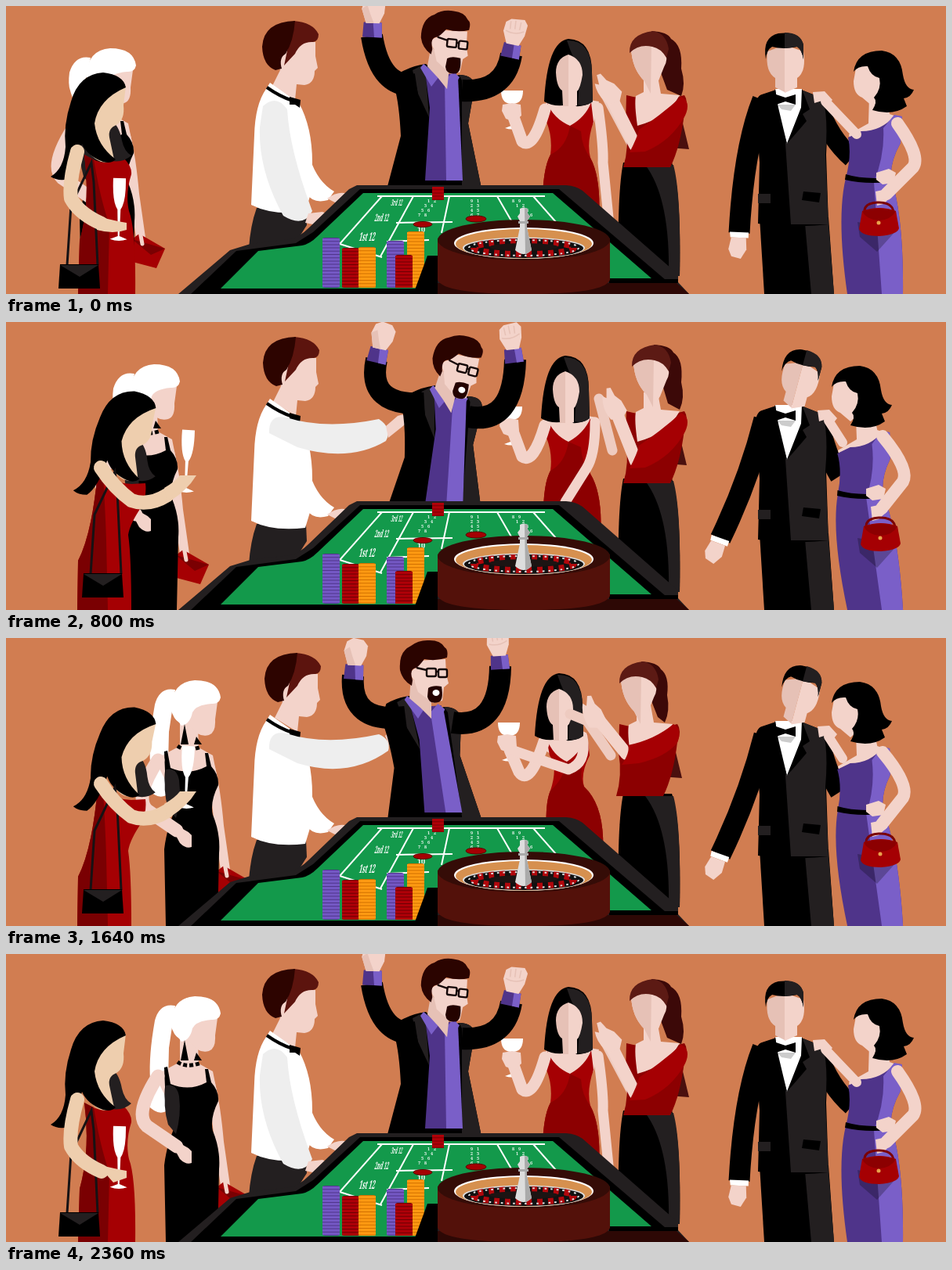
Recreate the animation shown at these times as an HTML page. Size 1200 px wide and 368 px high, loop 2.4 s.

```html
<!DOCTYPE html>
<html lang="en">
<head>
<meta charset="utf-8">
<title>Casino night</title>
<style>
html, body { margin: 0; width: 100%; height: 100%; overflow: hidden; background: #d17d51; }
svg { display: block; width: 100%; height: 100%; }
.skin { fill: #f3d3ca; }
.shade { fill: #e6c1b6; }
.tan { fill: #eeceae; }
.red { fill: #a50003; }
.crimson { fill: #8c0001; }
.wine { fill: #7a0002; }
.gray { fill: #231f20; }
.violet { fill: #7a5fc8; }
.plum { fill: #4f348a; }
.white { fill: #fff; }
.limb { fill: none; stroke: #f3d3ca; stroke-linecap: round; stroke-linejoin: round; }
.sleeve { fill: none; stroke: #000; }
.line { fill: none; stroke: #fff; stroke-width: 2; }
.chips { fill: none; stroke-width: 22; stroke-dasharray: 3.2 1; }
text { fill: #fff; font-family: "Noto Serif", serif; font-weight: 700; }
</style>
</head>
<body>
<svg viewBox="0 0 1200 368" preserveAspectRatio="none">
<rect width="1200" height="368" fill="#d17d51"/>

<!-- Blonde woman walking in -->
<g data-seq="0123444" data-m="translate(-108 0)|translate(-87 -2)|translate(-52 0)|translate(-17 1)|translate(0 0)">
  <path class="white" data-d="M216 66Q196 62 189 85Q187 100 190 108Q192 116 194 118Q200 120 206 118L208 100Z|M216 66Q196 62 189 85Q187 100 190 108Q192 116 194 118Q200 120 206 118L208 100Z|M216 66Q196 62 189 85Q187 100 190 108Q192 116 194 118Q200 120 206 118L208 100Z|M216 66Q196 62 189 85Q187 100 190 108Q192 116 194 118Q200 120 206 118L208 100Z|M216 66Q196 62 190 85Q182 130 184 160Q177 180 180 192Q194 208 206 200L208 120Z"/>
  <path class="limb" stroke-width="12" d="M261 166Q268 195 272 240L280 296"/>
  <path class="red" d="M269 298L278 291L311 310L300 335L266 326Z"/>
  <path class="wine" d="M269 298L311 310L293 318Z"/>
  <path class="limb" stroke-width="5" d="M279 288L282 304"/>
  <path class="skin" d="M222 105L245 115L246 140L264 150L270 180L205 185L190 155L222 138Z"/>
  <path d="M202 145L206 144L210 166Q234 176 256 164L254 147L258 147L262 164Q272 175 271 188Q260 210 264 226Q274 250 272 275L270 368H204L202 270Q205 245 214 224Q200 195 203 170Z"/>
  <path class="gray" d="M204 168Q218 165 221 182Q224 205 217 230L207 218Q200 195 204 168Z"/>
  <path class="limb" stroke-width="17" d="M194 156Q163 204 180 220L218 246"/>
  <path class="skin" d="M210 240Q228 242 237 252L237 267Q230 270 222 262Z"/>
  <path class="skin" d="M230 84L270 82L267 104Q268 121 259 124Q246 128 234 112L222 108Z"/>
  <path class="white" d="M210 90Q212 56 241 54Q271 54 274 76Q272 85 262 84Q242 86 238 95Q235 110 224 112L221 108Q214 104 210 90Z"/>
  <path d="M228 110L223 136H233ZM243 126L240 136H250Z"/>
  <path fill="none" stroke="#000" stroke-width="5" stroke-dasharray="5 3" d="M219 138Q230 146 249 139"/>
</g>

<!-- Dark haired woman with flute -->
<g data-seq="0122220">
  <path class="red" data-d="M100 190Q122 204 135 198L150 194Q161 205 160 215Q152 240 157 262Q166 285 165 368H92L94 300Q108 250 100 190Z|M108 192Q126 205 145 198L160 198Q167 208 165 220Q158 240 158 262Q164 285 163 368H91L96 300Q110 250 108 192Z|M117 192Q138 206 160 207L178 206Q180 222 173 236Q158 258 156 272Q160 300 160 368H91L92 305Q110 270 117 192Z"/>
  <path class="wine" data-d="M100 190L112 196Q120 245 132 280L130 368H92L94 300Q108 250 100 190Z|M108 192L118 196Q120 245 128 280L128 368H91L96 300Q110 250 108 192Z|M117 192L124 197Q127 245 128 280L130 368H91L92 305Q110 270 117 192Z"/>
  <g data-m="translate(0 0) rotate(0)|translate(1 6) rotate(-3)|translate(48 -7) rotate(5)">
    <path class="gray" d="M132 146Q144 150 148 172Q151 186 160 191Q148 202 130 197L112 172Z"/>
    <path class="tan" d="M153 102L150 127Q152 145 141 152Q130 156 132 168L138 196Q120 207 104 185L106 125Z"/>
    <path d="M153 104Q150 88 124 85Q93 87 83 122Q73 152 76 180Q74 208 57 218Q64 223 75 222Q88 212 97 176Q104 192 124 199Q134 202 140 196Q116 178 113 150Q118 119 153 104Z"/>
  </g>
  <g data-m="translate(0 0)|translate(15 -14)|translate(30 -9)">
    <path fill="none" stroke="#161214" stroke-width="3" d="M78 331L83 255L109 200L112 225L117 331"/>
    <path d="M69 330H118L120 361H67Z"/><path class="gray" d="M69 331H118L94 346Z"/>
  </g>
  <g data-m="translate(145 220) rotate(1)|translate(197 180) rotate(1)|translate(233 138) rotate(3)">
    <path class="white" d="M-8 0H8Q9 30 2 40L1 74L11 78Q0 82-11 78L-1 74L-2 40Q-9 30-8 0Z"/>
  </g>
  <path class="limb" style="stroke:#eeceae" stroke-width="18" data-d="M91 186Q80 225 83 246Q94 266 122 278|M104 188Q112 220 118 236Q138 253 166 253|M121 186Q138 212 160 228Q182 236 206 221"/>
  <path class="tan" data-d="M117 269Q137 274 154 277L154 286Q137 292 116 286Z|M162 245Q182 245 193 238L211 240L206 250Q184 261 162 261Z|M202 212Q216 204 222 196L243 196L236 206Q220 224 206 230Z"/>
</g>

<!-- Dealer -->
<path class="gray" d="M320 258H383L384 280L365 310H310Q312 280 320 258Z"/>
<g data-seq="0123450" data-m="translate(0 0)|translate(3 0)|translate(1 0)|translate(6 1)|translate(3 0)|translate(5 1)">
  <path class="skin" d="M360 46L395 46L395 64L398 79L394 83Q394 99 381 101L371 100L369 120L340 102L350 82Q342 66 354 62Z"/>
  <path fill="#5c140e" d="M367 19Q392 21 399 36Q399 45 392 46Q376 45 369 61L355 76Z"/>
  <path fill="#2d0400" d="M369 19Q329 20 327 52Q328 76 344 82L352 80Q348 66 357 61Q367 45 369 19Z"/>
</g>
<path class="white" d="M388 195Q398 225 419 237L411 248Q392 253 384 240Z"/>
<path class="skin" d="M410 246Q424 236 436 240L444 248L440 254L422 252Z"/>
<path class="white" d="M337 98L374 124Q391 155 391 200L389 240L382 263Q340 268 313 254L317 165Q318 126 332 106Z"/>
<path fill="none" stroke="#000" stroke-width="4" d="M333 104Q350 116 366 121"/>
<path d="M362 116L376 120L375 130L369 126L362 126Z"/>
<g data-seq="0012340">
  <path fill="#eee" data-d="M328 128Q345 112 359 132Q362 185 391 262Q380 284 354 268Q322 210 324 155Z|M336 142Q335 117 358 122Q408 138 476 124Q494 136 485 152Q438 180 372 160Z|M336 142Q335 117 358 122Q408 138 468 121Q486 130 481 142Q428 182 372 164Z|M336 142Q335 117 358 122Q408 138 476 123Q492 130 488 144Q438 180 372 160Z|M336 142Q335 117 358 122Q408 138 466 123Q482 132 476 148Q428 184 372 168Z"/>
  <path class="skin" data-d="M386 265L404 263Q414 266 420 276L406 282L382 277Z|M485 133L500 120Q510 116 518 121L508 132L488 148Z|M474 126L490 110Q498 106 506 110L504 122L484 138Z|M484 125L502 110Q508 106 518 110L512 124L490 138Z|M470 127L486 111Q490 106 498 111L496 129L476 146Z"/>
</g>

<!-- Woman in red with coupe glass -->
<g data-seq="0012220">
  <path class="skin" data-d="M708 100H731L732 118L757 122L750 150L720 160L683 138L690 123L708 119Z|M708 100H730L731 118L754 122L750 150L720 160L683 138L690 123L708 119Z|M699 100H723L724 120L741 121L744 150L716 162L680 138L686 124L699 120Z"/>
  <path class="red" data-d="M691 124Q699 144 720 153Q740 142 747 123L750 148Q741 174 746 194Q760 220 757 275H685Q683 212 695 190Q698 168 690 148Z|M691 124Q699 144 718 153Q738 142 746 123L748 148Q739 174 746 194Q762 220 759 275H687Q683 212 695 190Q698 168 690 148Z|M690 128Q698 150 716 158Q735 146 742 122L745 150Q733 174 738 190Q765 215 762 275H692Q686 215 695 195Q705 165 694 150Z"/>
  <path class="crimson" data-d="M720 153L734 160Q735 180 746 194Q760 220 757 275H685Q683 212 695 190Q716 180 720 153Z|M718 153L734 160Q735 180 746 194Q762 220 759 275H687Q683 212 695 190Q714 180 718 153Z|M716 158L736 160Q732 178 738 190Q765 215 762 275H692Q686 215 695 195Q712 180 716 158Z"/>
  <path class="white" data-m="translate(646 107)|translate(645 107)|translate(642 107)" d="M-14 1H14Q14 17 2 18L1 46L9 49Q0 52-9 49L-1 46L-2 18Q-14 17-14 1Z"/>
  <path class="limb" stroke-width="15" data-d="M688 132Q673 184 659 173L648 142|M688 132Q673 182 659 172L648 142|M687 132Q668 190 655 171L643 143"/>
  <path class="skin" data-m="translate(646 134)|translate(643 133)|translate(640 133)" d="M-12-8L0-10L11-8L12 6L3 14L-8 10L-13 0Z"/>
  <path class="limb" stroke-width="13" data-d="M756 130Q763 180 762 200L769 270|M752 128Q752 170 741 187L714 230|M736 126Q742 160 718 168L648 144"/>
  <g data-m="translate(0 0)|translate(-4 1)|translate(-12 3)">
    <path d="M687 122Q691 45 718 42Q748 43 748 85L749 122Q733 132 719 126Q700 130 687 122Z"/>
    <path class="gray" d="M716 44Q747 43 748 85L749 122Q741 129 730 126L733 80Q724 69 716 44Z"/>
    <path class="shade" d="M718 62Q702 67 702 85Q703 104 710 108L711 128H720Z"/>
    <path class="skin" d="M718 62Q736 68 736 88Q733 106 729 109V127L718 132Z"/>
  </g>
</g>

<!-- Clapping woman -->
<g data-seq="0123440">
  <path fill="#4a100e" data-m="translate(0 0)|translate(3 0)|translate(-3 0)|translate(-19 -4)|translate(-9 -4)" d="M850 150L864 150L872 183L846 181Z"/>
  <path class="limb" style="stroke:#eecbc0" stroke-width="13" data-d="M800 178L766 114|M800 180L769 114|M774 164L757 98|M776 150L742 98|M772 150L742 106L720 97"/>
  <g data-m="translate(0 0)|translate(2 0)|translate(0 0)|translate(-5 -1)|translate(0 -1)">
    <path d="M788 200H850Q862 235 860 345H782Q780 240 788 200Z"/>
    <path class="gray" d="M816 203H852Q862 240 860 345H846Q848 245 816 203Z"/>
  </g>
  <g data-m="translate(0 0)|translate(2 0)|translate(0 0)|translate(-14 -4)|translate(-9 -4)">
    <path class="crimson" d="M792 114Q830 124 866 114Q872 122 866 137Q861 180 848 206H788Q796 180 791 150Z"/>
    <path class="skin" d="M814 90H832L836 112L860 114Q844 143 806 153Q802 125 804 115L814 110Z"/>
  </g>
  <path class="limb" stroke-width="16" data-d="M803 178L771 114|M804 178L774 114|M804 178L778 112|M784 150L748 108|M792 148L753 100"/>
  <path class="red" data-d="M862 116Q875 122 867 140Q850 172 816 186L796 187Q806 168 808 158Q835 140 862 116Z|M864 116Q877 122 869 140Q852 172 818 186L798 187Q808 168 810 158Q837 140 864 116Z|M862 116Q875 122 867 140Q850 172 816 186L796 187Q806 168 808 158Q835 140 862 116Z|M846 110Q858 116 851 134Q836 152 802 160L780 162Q791 146 788 137Q822 130 846 110Z|M852 110Q864 116 857 134Q842 152 808 160L786 162Q797 146 794 137Q828 130 852 110Z"/>
  <path class="skin" data-m="translate(767 105) rotate(-32)|translate(770 105) rotate(-30)|translate(775 104) rotate(-18)|translate(744 96) rotate(-8)|translate(749 94) rotate(-14)" d="M-9 19Q-16 2-10-13L-6-9L-2-21L3-20L5-9L11 0L14 14L5 23Z"/>
  <g data-m="translate(0 0)|translate(6 -3)|translate(3 -3)|translate(-18 -2)|translate(-13 -2)">
    <path fill="#3c0908" data-d="M824 32Q845 33 849 42Q864 50 862 80Q868 100 862 115L844 107L834 80Z|M824 32Q845 33 849 42Q862 50 859 80Q864 100 856 115L842 105L834 80Z|M824 32Q845 33 849 42Q862 50 859 80Q864 100 857 115L842 107L834 80Z|M824 32Q845 33 849 42Q860 50 857 75Q861 95 854 110L845 103L836 80Z|M824 32Q845 33 849 42Q860 50 857 75Q861 95 854 110L845 103L836 80Z"/>
    <path class="skin" d="M798 54Q821 40 841 58Q846 68 840 78L832 98L823 112L815 96Q799 80 798 54Z"/>
    <path class="shade" d="M798 54Q812 46 824 48L823 112L815 96Q799 80 798 54Z"/>
    <path fill="#5c1a14" d="M796 60Q795 36 826 32Q843 35 846 55L843 66Q836 54 825 52Q808 48 796 60Z"/>
  </g>
</g>

<!-- Cheering player -->
<g data-seq="0123450">
  <g data-m="matrix(1 0 0 1 0 0)|matrix(1 0 -.071 1 16 6)|matrix(1 0 -.079 1 18 7)|matrix(1 0 .064 1 -15 0)|matrix(1 0 .136 1 -31 0)|matrix(1 0 .057 1 -13 0)">
    <path d="M505 84Q520 76 536 74L560 95L578 88Q598 88 598 104L590 150L608 238H485L504 166Q502 125 496 104Z"/>
    <path class="gray" d="M578 88Q598 88 598 104L590 150L608 238H582V95ZM535 74L519 82L526 112L540 142Z"/>
    <path class="plum" d="M534 76L552 88L575 86L582 223H535L541 130Z"/>
    <path class="violet" d="M560 96L577 90L583 223H562Z"/>
    <path class="violet" d="M533 74L529 79L543 103L553 90ZM557 98L571 84L579 91L571 105Z"/>
  </g>
  <path class="sleeve" stroke-width="28" data-d="M524 100Q478 107 467 38|M534 104Q436 84 488 36|M534 104Q460 108 473 48|M514 101Q429 82 466 26|M510 101Q438 110 443 48|M524 96Q432 78 490 26"/>
  <path class="sleeve" stroke-width="28" data-d="M582 108Q637 111 645 62|M590 118Q660 138 644 86|M590 121Q648 132 650 48|M572 106Q641 110 666 51|M570 108Q630 117 631 36|M576 107Q645 112 660 65"/>
  <g data-m="translate(468 40) rotate(2)|translate(487 39) rotate(24)|translate(473 52) rotate(13)|translate(464 30) rotate(22)|translate(444 53) rotate(4)|translate(488 31) rotate(33)">
    <path class="plum" d="M-12-19H11L12 0H-13Z"/><path class="violet" d="M0-19H11L12 0H2Z"/>
    <path class="skin" d="M-9-18L-15-36L-12-48L-4-53L9-51L15-44L14-31L8-18Z"/>
    <path class="shade" d="M-9-18L-15-36L-8-41L-4-30L1-18Z"/>
  </g>
  <g data-m="translate(643 66) rotate(12)|translate(642 89) rotate(-3)|translate(649 52) rotate(-7)|translate(663 57) rotate(26)|translate(631 40) rotate(-4)|translate(658 70) rotate(17)">
    <path class="plum" d="M-11-18H11L12 0H-12Z"/><path class="violet" d="M2-18H11L12 0H3Z"/>
    <path class="skin" d="M-8-17L-15-32L-14-44L-8-49L9-51L14-45L13-31L8-17Z"/>
    <path fill="none" stroke="#e6c1b6" stroke-width="1.5" d="M-8-46L-7-36M-2-48L-1-37M5-47V-37M-12-33Q0-29 11-36"/>
  </g>
  <g data-m="translate(553 87) rotate(6)|translate(559 94) rotate(14)|translate(561 96) rotate(14)|translate(545 85) rotate(0)|translate(531 85) rotate(0)|translate(549 85) rotate(3)">
    <path class="shade" d="M-14-35L12-8V18L-2 4L-16-8Z"/>
    <path class="skin" d="M-6-56L30-58L31-39L34-27L28-22L26-5L14-2L-5-16L-10-31Q-20-42-7-47Z"/>
    <path fill="#2b0400" d="M-28-44Q-30-68-14-75Q-4-83 10-82Q24-82 29-73Q34-70 32-60Q18-55 3-58Q-3-50-7-47Q-17-46-12-31L-13-24Q-25-31-28-44Z"/>
    <path fill="#240300" d="M8-21Q14-25 25-23Q28-5 21-3Q9 0 7-10Z"/>
    <g fill="none" stroke="#150606" stroke-width="2.4"><rect x="6" y="-46" width="12" height="10" rx="2"/><rect x="21" y="-45" width="11" height="10" rx="2"/><path d="M-7-47L6-44M18-42H21"/></g>
    <ellipse class="white" cx="18" data-m="translate(0 -15) scale(0)|translate(0 -14) scale(1)|translate(0 -14) scale(1)|translate(0 -14) scale(1)|translate(0 -15) scale(1)|translate(0 -14) scale(1)" rx="4.500" ry="4"/>
  </g>
</g>

<!-- Man in tuxedo -->
<g data-seq="0122220">
  <path class="sleeve" stroke-width="25" data-d="M1036 126Q1052 170 1080 194|M1036 126Q1050 170 1074 194|M1038 126Q1047 170 1064 197"/>
  <path d="M962 270H1050L1057 368H968Z"/><path class="gray" d="M1020 278H1050L1057 368H1028Z"/>
  <path class="sleeve" stroke-width="27" data-d="M966 120Q942 180 936 290|M966 122Q942 190 928 285|M968 124Q949 200 912 277"/>
  <g data-m="translate(936 289) rotate(2)|translate(928 284) rotate(9)|translate(912 276) rotate(20)">
    <path class="white" d="M-12 0H12V7H-11Z"/><path class="skin" d="M-10 7H9L10 22L3 34L-9 31L-13 22Z"/>
  </g>
  <path d="M983 107L965 113Q956 116 957 134L962 200L960 278Q1000 284 1050 279L1047 190Q1050 145 1043 118L1012 106Z"/>
  <path class="gray" d="M1013 106L1043 118Q1050 145 1046 190L1050 279H1002L995 176Z"/>
  <path class="white" d="M982 106H1016L1016 128L997 176L985 135Z"/>
  <path d="M982 106L986 130L997 176L976 147L980 138L972 134ZM1016 106L1015 130L997 176L1022 147L1017 138L1026 132Z"/>
  <path fill="#ccc" d="M985 126L1008 126L1002 134L990 132Z"/>
  <path class="gray" d="M960 240H976V252H960Z"/><path d="M1018 237L1040 239L1038 251L1016 248Z"/>
  <g data-m="translate(996 108) rotate(0)|translate(1000 108) rotate(6)|translate(1005 108) rotate(15)">
    <path class="shade" d="M-24-50L-2-58V2L-14-4V-16Q-27-24-24-50Z"/>
    <path class="skin" d="M-2-58L22-50Q26-24 14-16V-4L-2 3Z"/>
    <path d="M-26-40Q-31-68-10-73Q18-76 22-58V-40Q20-52 14-56Q-4-52-18-56Q-25-52-26-40Z"/>
    <path class="gray" d="M-2-74Q19-74 22-58V-40Q20-52 14-56L-2-54Z"/>
  </g>
  <path d="M983 113L995 117L1008 113V126L995 122L983 126Z"/>
</g>

<!-- Woman in purple -->
<g data-seq="0122220">
  <g data-m="matrix(1 0 0 1 0 0)|matrix(1 0 .032 1 -12 0)|matrix(1 0 .069 1 -25.3 0)">
    <path class="skin" d="M1102 115H1125L1128 138L1142 143L1122 165L1078 174L1076 164L1101 150Z"/>
    <path class="plum" d="M1075 168L1092 160Q1118 160 1134 140L1143 141L1142 175Q1128 200 1130 220Q1146 270 1145 368H1074Q1060 270 1072 220Q1080 190 1075 168Z"/>
    <path class="violet" d="M1120 156L1134 139L1144 141L1142 175Q1128 200 1130 220Q1146 270 1145 368H1118L1108 225Q1122 190 1120 156Z"/>
    <path d="M1072 215Q1095 222 1128 219V225Q1095 228 1071 222Z"/>
  </g>
  <path class="limb" stroke-width="12" data-d="M1086 164L1046 122|M1078 161L1045 122|M1068 154L1050 126"/>
  <path class="skin" data-m="translate(1041 117)|translate(1041 117)|translate(1047 120)" d="M-11-7L4-8L14 3L7 12L1 4L-9 7Z"/>
  <path class="skin" data-m="translate(1123 218)|translate(1118 218)|translate(1110 218)" d="M-12-5L4-10L13-5L10 8L-4 10L-12 4Z"/>
  <path opacity=".25" d="M1087 276L1138 285L1112 314L1090 295Z"/>
  <path class="limb" stroke-width="16" data-d="M1138 150Q1168 192 1158 206L1124 240|M1133 148Q1164 192 1153 206L1122 240|M1119 146Q1154 188 1145 204L1118 238"/>
  <path class="skin" data-m="translate(1120 243)|translate(1118 243)|translate(1114 242)" d="M-10-6L4-9L11 0L0 10L-8 12Z"/>
  <g data-m="translate(0 0)|translate(0 0)|translate(2 -1)">
    <path fill="none" stroke="#7a0002" stroke-width="3" d="M1096 262Q1096 252 1112 251Q1130 250 1133 262"/>
    <path class="red" d="M1093 262Q1115 254 1136 262L1140 284Q1138 292 1115 294Q1092 294 1089 285Z"/>
    <path class="crimson" d="M1093 262Q1115 255 1136 262Q1130 273 1115 274Q1098 273 1093 262Z"/>
    <circle cx="1114" cy="277" r="2.5" fill="#e9a24c"/>
  </g>
  <g data-m="translate(0 0)|translate(-8 0)|translate(-28 -1)">
    <path class="skin" d="M1086 74L1082 96Q1082 113 1093 117L1106 128L1122 115L1110 76Z"/>
    <path d="M1082 84Q1086 57 1118 57Q1142 60 1145 88Q1148 106 1159 107Q1155 117 1146 118L1150 128Q1132 141 1106 133Q1113 122 1108 117Q1118 106 1115 92Q1104 90 1100 77Q1088 76 1082 84Z"/>
  </g>
</g>

<!-- Table -->
<path class="gray" d="M448 229H715Q728 230 736 236L858 343V353L872 368H220L286 312L312 304L362 298Q374 296 386 284L438 234Z"/>
<path d="M452 234H706L842 350H545L540 368H236L294 313L370 303L392 289Z"/>
<path d="M456 239H698L824 348H550L540 361H274L322 313L378 306Q388 304 398 294Z" fill="#13994b"/>
<path d="M545 354H856L872 368H540Z" fill="#2d0805"/>
<path d="M770 349H858V354H770Z"/>
<path class="line" d="M474 243H688M480 243L426 304L480 321M520 243L478 320M566 243L556 290M627 243L646 276M673 243L702 276M498 277L570 276M486 301L540 299"/>
<text font-size="15" transform="matrix(.48 0 -.25 1 450 300)">1st 12</text>
<text font-size="13" transform="matrix(.42 0 -.25 1 470 275)">2nd 12</text>
<text font-size="11" transform="matrix(.42 0 -.25 1 491 255)">3rd 12</text>
<g id="numbers"></g>
<path class="wine" d="M544 231H559V248H544Z"/>
<path class="chips" stroke="#b00008" style="stroke-width:15" d="M551.500 231V248"/>
<g fill="#a50003" stroke="#5c0000"><ellipse cx="532" cy="279" rx="12" ry="3.500"/><ellipse cx="600" cy="272" rx="13" ry="4"/></g>
<g id="stacks"></g>
<path d="M538 319H551V368H520Z"/>

<!-- Roulette wheel -->
<path fill="#53110a" d="M551 297H771V350Q764 368 661 368Q558 368 551 350Z"/>
<ellipse cx="661" cy="299" rx="110" ry="26" fill="#350c07"/>
<ellipse cx="661" cy="303" rx="89" ry="20" fill="#fff"/>
<ellipse cx="661" cy="304" rx="87" ry="19" fill="#d6904f"/>
<ellipse cx="661" cy="309" rx="78" ry="13.500" fill="#ddd"/>
<ellipse cx="661" cy="309.500" rx="76" ry="12.500" fill="#111"/>
<g fill="none">
  <ellipse cx="661" cy="309" rx="64" ry="8" stroke="#b1070c" stroke-width="8" pathLength="38" stroke-dasharray="1 1"/>
  <ellipse cx="661" cy="309" rx="70" ry="10" stroke="#ddd" stroke-width="2" pathLength="76" stroke-dasharray=".7 1.3"/>
</g>
<ellipse cx="661" cy="308" rx="44" ry="5" fill="#1c1413"/>
<path fill="#ddd" d="M656 259Q661 256 666 259V265L669 269L665 275V283L671 312Q661 322 650 312L656 283V275L653 269L656 265Z"/>
<path fill="#aaa" d="M662 258L666 259V265L669 269L665 275V283L671 312L663 318ZM654 275H667V278H654Z"/>
</svg>
<script>
const LOOP = 2400, STEP = 40;
const times = [0, 280, 800, 1280, 1640, 1960, 2360];
const number = /-?(\d+\.?\d*|\.\d+)/g;
const $ = id => document.getElementById(id);

// Chip stacks: left, top, bottom, light, dark
$('stacks').innerHTML = [
  [404, 296, 360, '#7458c4', '#4f348a'],
  [429, 309, 360, '#b00008', '#6b0002'],
  [450, 308, 360, '#ff9a12', '#d07000'],
  [486, 300, 360, '#7458c4', '#4f348a'],
  [512, 288, 360, '#ff9a12', '#d07000'],
  [497, 318, 360, '#b00008', '#6b0002']
].map(([x, top, end, light, dark]) =>
  `<rect x="${x}" y="${top}" width="22" height="${end - top}" rx="3" fill="${dark}"/>
   <path class="chips" stroke="${light}" d="M${x + 11} ${top + 1}V${end}"/>`).join('');

// Small figures in the three columns of the cloth
let cells = '';
for (let i = 0; i < 24; i++) {
  const row = i >> 1 & 3, col = i >> 3;
  const x = [538, 593, 646][col] + [-4, 0, 5][col] * row + i % 2 * 8;
  cells += `<text x="${x}" y="${251 + row * 6}" font-size="5.5">${i % 9 + 1}</text>`;
}
$('numbers').innerHTML = cells + '<text x="525" y="289" font-size="9">10</text>';

// Blend two strings that differ only in their numbers
function mix(a, b, k) {
  if (a === b) return a;
  const ends = b.match(number);
  let i = 0;
  return a.replace(number, n => ' ' + (+n + (ends[i++] - n) * k).toFixed(3));
}

const parts = [];
for (const el of document.querySelectorAll('[data-d],[data-m]')) {
  const order = el.closest('[data-seq]').dataset.seq;
  const [name, list] = el.dataset.d ? ['d', el.dataset.d] : ['transform', el.dataset.m];
  const poses = list.split('|');
  parts.push({ el, name, keys: [...order].map(n => poses[n]) });
}

function draw(now) {
  const t = Math.floor(now % LOOP / STEP) * STEP;
  let i = 0;
  while (i < times.length - 2 && t >= times[i + 1]) i++;
  const k = (t - times[i]) / (times[i + 1] - times[i]);
  for (const { el, name, keys } of parts) el.setAttribute(name, mix(keys[i], keys[i + 1], k));
}

function tick() {
  draw(performance.now());
  requestAnimationFrame(tick);
}
tick();
</script>
</body>
</html>
```
